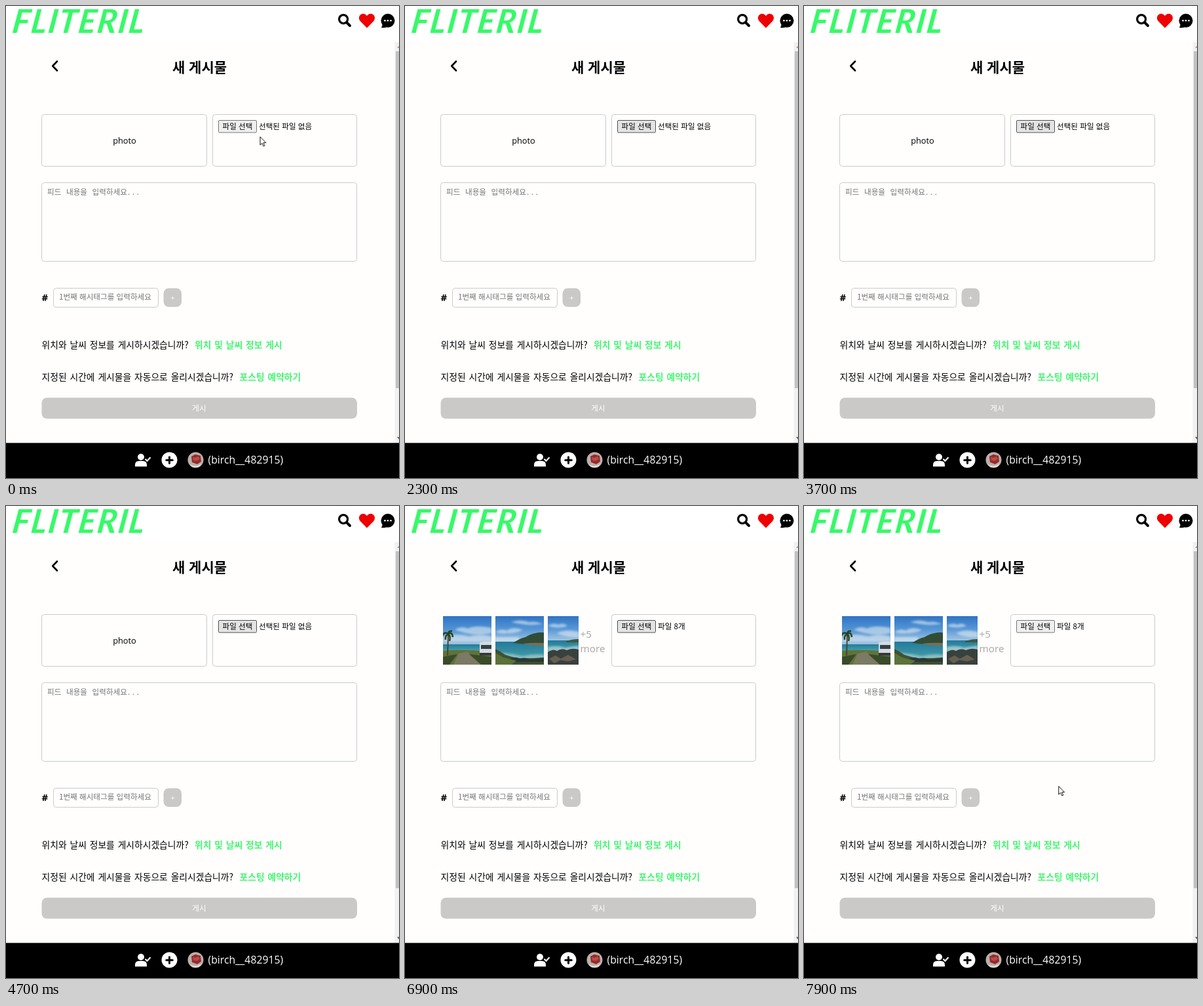
Recreate the animation shown at these times as an HTML page. Size 600 by 720 pixels, loop 8 s.

```html
<!DOCTYPE html>
<html lang="ko">
<head>
<meta charset="utf-8">
<title>새 게시물</title>
<style>
html, body { margin: 0; width: 100%; height: 100%; overflow: hidden; background: #fff; }
svg { display: block; width: 600px; height: 720px; }
text { font-family: "Noto Sans CJK KR", "Noto Sans CJK", sans-serif; }
.latin { font-family: "Open Sans", "Noto Sans", sans-serif; }
.logo { font: italic 700 50px Lato, sans-serif; fill: #36fa68; letter-spacing: 2px; }
.title { font-size: 21px; font-weight: 700; }
.ask { font-size: 13.8px; word-spacing: 1px; }
.link { font-weight: 700; fill: #45f573; }
.small { font-size: 11.6px; }
.hint { fill: #757575; }
.area { word-spacing: 4.4px; }
.dots { letter-spacing: 3.6px; }
.mid { text-anchor: middle; }
.box { fill: #fffefd; stroke: #cbcbcb; }
.off { fill: #cac9c8; }
.pick { fill: #efefef; stroke: #767676; animation: hover 8s step-end infinite; }
.before { animation: before 8s step-end infinite; }
.after { animation: after 8s step-end infinite; }
.cursor { animation: move 8s linear infinite, blink 8s step-end infinite; }
@keyframes hover {
  0%, 90% { fill: #efefef; stroke: #767676; }
  4% { fill: #e4e4e4; stroke: #505050; }
}
@keyframes before { 0% { visibility: visible; } 77.5%, 100% { visibility: hidden; } }
@keyframes after { 0% { visibility: hidden; } 77.5%, 100% { visibility: visible; } }
@keyframes blink {
  0%, 90%, 100% { visibility: visible; }
  13.75% { visibility: hidden; }
}
@keyframes move {
  0%, 1.25% { transform: translate(387.5px, 199px); }
  7%, 50% { transform: translate(362px, 185px); }
  50.01%, 100% { transform: translate(388.3px, 427px); }
}
</style>
</head>
<body>
<svg viewBox="0 0 600 720">
  <defs>
    <linearGradient id="sky" x2="0" y2="1">
      <stop offset="0" stop-color="#2f74c4"/>
      <stop offset=".5" stop-color="#5797d6"/>
      <stop offset="1" stop-color="#a9c9e2"/>
    </linearGradient>
    <linearGradient id="sea" x2="0" y2="1">
      <stop offset="0" stop-color="#237a9c"/>
      <stop offset="1" stop-color="#4fa9a9"/>
    </linearGradient>
    <filter id="soft"><feGaussianBlur stdDeviation="1.5"/></filter>
    <clipPath id="wide"><path d="M0 0h74v74H0z"/></clipPath>
    <clipPath id="slim"><path d="M0 0h47v74H0z"/></clipPath>
  </defs>

  <!-- page -->
  <rect width="600" height="720" fill="#fff"/>
  <rect y="55" width="594" height="612" fill="#fffefd"/>
  <rect x="593.5" y="55" width="7" height="612" fill="#f1f1f1"/>
  <rect x="595" y="69" width="5" height="514" fill="#c1c1c1"/>
  <path d="M597 64l3-3.500V64z" fill="#a3a3a3"/>
  <path d="M597 657.500h3v3.500z" fill="#505050"/>

  <!-- header -->
  <text class="logo" transform="translate(8 41) skewX(-8)">FLITERIL</text>
  <g fill="none" stroke="#000">
    <circle cx="515.100" cy="20.100" r="6.500" stroke-width="3.200"/>
    <path d="M520 25l5 5" stroke-width="3.900" stroke-linecap="round"/>
    <path d="M78 84.500l-6.800 7 6.800 7" stroke-width="2.600" stroke-linecap="round" stroke-linejoin="round"/>
  </g>
  <path d="M551 33.500l-10-10.300c-3-3.300-2.600-8 .7-10.300 3-2 6.400-1.200 9.300 2 2.900-3.200 6.300-4 9.300-2 3.300 2.300 3.700 7 .7 10.300z" fill="#ee0000"/>
  <circle cx="583" cy="22.300" r="10.500"/>
  <path d="M573 33q2-3 1.500-6l7 5q-4 2-8.500 1z"/>
  <g fill="#fff">
    <circle cx="578.500" cy="22.300" r="1.300"/><circle cx="583" cy="22.300" r="1.300"/><circle cx="587.500" cy="22.300" r="1.300"/>
  </g>
  <text class="title mid" x="295.500" y="101">새 게시물</text>

  <!-- photos -->
  <g class="before">
    <rect class="box" x="54.500" y="165.500" width="252" height="79" rx="4"/>
    <text class="latin mid" x="181" y="210" font-size="12.800">photo</text>
  </g>
  <g class="after">
    <g transform="translate(58 168)" clip-path="url(#wide)">
      <path d="M0 0h74v46H0z" fill="url(#sky)"/>
      <path d="M18 21q10-7 20-2 12-6 36-1v8q-26 6-56-5zM0 32q20-7 40-1 18-5 34 0v8H0z" fill="#dfe9f0" opacity=".6" filter="url(#soft)"/>
      <path d="M0 43h74v12H0z" fill="url(#sea)"/>
      <path d="M0 53q20-3 74 1v20H0z" fill="#5f7339"/>
      <path d="M24 57l13-3 22 20H16z" fill="#7c7a62"/>
      <path d="M0 62l22-4-12 16H0zM40 58l34 4v12H58z" fill="#394b29"/>
      <path d="M8 28l-1 32" stroke="#4b4431" stroke-width="2"/>
      <path d="M8 27q-6-4-9 3M8 27q6-4 7 5M8 27q-5 3-4 9M8 27q4 4 2 11M8 27q0-5 6-4" fill="none" stroke="#27441f" stroke-width="2.500"/>
      <path d="M56 40q8-2 18-1v20H56z" fill="#d4dadd"/>
      <path d="M58 44h16v6H58z" fill="#32414c"/>
      <path d="M56 56h18v4H56z" fill="#34393b"/>
    </g>
    <g transform="translate(138 168)" clip-path="url(#wide)">
      <path d="M0 0h74v41H0z" fill="url(#sky)"/>
      <path d="M0 24q9-6 18-2 9-7 24-1-10 6-24 5-10 2-18-2zM24 9q14-5 28 0 9-2 20 3-22 4-48-3zM0 32h36v7H0z" fill="#dfe9f0" opacity=".6" filter="url(#soft)"/>
      <path d="M0 39h74v35H0z" fill="url(#sea)"/>
      <path d="M27 41q10-7 19-9 8-5 15-6 8-2 13-1v19q-20 0-47-3z" fill="#314d36"/>
      <path d="M42 42q15-2 32-1v4q-18 1-32-3z" fill="#776f59"/>
      <path d="M4 55q18 2 38 6 16-4 32-2v7q-24 1-42-2-18-2-28-9z" fill="#c5dedb" opacity=".55" filter="url(#soft)"/>
      <path d="M0 50q9 4 15 9l17 5q19 1 42-1v11H0z" fill="#405133"/>
      <path d="M22 65q8-4 16 0 8-3 14 1l22-2v6H24z" fill="#2d3733"/>
      <path d="M0 56l12 7 20 5-8 6H0z" fill="#5a733a"/>
    </g>
    <g transform="translate(218 168)" clip-path="url(#slim)">
      <path d="M0 0h47v39H0z" fill="url(#sky)"/>
      <path d="M0 15q8-6 16-2 8-4 14 2-14 5-30 0zM14 26q13-7 33-2v8q-20 1-33-6z" fill="#dfe9f0" opacity=".6" filter="url(#soft)"/>
      <path d="M0 37h47v22H0z" fill="url(#sea)"/>
      <path d="M28 38q10-3 19-3v5H28z" fill="#3b5a45"/>
      <path d="M0 47q16-3 26 1l21-3v8q-26 5-47 1z" fill="#d6e5e4" opacity=".6" filter="url(#soft)"/>
      <path d="M0 55q8-6 14-2 8-5 15-1 8-4 18-1v23H0z" fill="#39413e"/>
      <path d="M2 65l10-5 8 5 11-6 12 7-12 3-12-2-9 5z" fill="#675f50"/>
    </g>
    <g fill="#a6a6a6" font-size="15.300">
      <text class="latin" x="267.500" y="201">+5</text>
      <text class="latin" x="267.500" y="223">more</text>
    </g>
  </g>

  <!-- file field -->
  <rect class="box" x="315.500" y="165.500" width="220" height="79" rx="4"/>
  <rect class="pick" x="324.500" y="174.500" width="58" height="18.500" rx="1.500"/>
  <text class="small mid" x="353.500" y="188.300">파일 선택</text>
  <text class="small before" x="386" y="188.300">선택된 파일 없음</text>
  <text class="small after" x="386" y="188.300">파일 8개</text>

  <!-- form -->
  <rect class="box" x="54.500" y="269.500" width="481" height="120" rx="4"/>
  <text class="small hint area" x="63" y="288">피드 내용을 입력하세요<tspan class="dots" dx="1">...</tspan></text>
  <text class="latin" x="54.500" y="450.300" font-size="15" font-weight="700">#</text>
  <rect class="box" x="72.500" y="430.500" width="160" height="29" rx="4"/>
  <text class="small hint" x="81" y="448.300">1번째 해시태그를 입력하세요</text>
  <rect class="off" x="240.500" y="430.500" width="27.500" height="28.500" rx="8"/>
  <text class="latin mid" x="254.500" y="448.500" font-size="11" fill="#fff">+</text>
  <text class="ask" x="54.500" y="521.500">위치와 날씨 정보를 게시하시겠습니까?</text>
  <text class="ask link" x="288" y="521.500">위치 및 날씨 정보 게시</text>
  <text class="ask" x="54.500" y="570.500">지정된 시간에 게시물을 자동으로 올리시겠습니까?</text>
  <text class="ask link" x="356.500" y="570.500">포스팅 예약하기</text>
  <rect class="off" x="54.500" y="597.500" width="481.500" height="32" rx="8"/>
  <text class="small mid" x="295" y="618" fill="#fff">게시</text>

  <!-- footer -->
  <rect y="666.500" width="600" height="54"/>
  <g fill="#fff">
    <circle cx="206" cy="688" r="5"/>
    <path d="M197 702.500v-2.500q0-6 6-6h6q6 0 6 6v2.500z"/>
    <path d="M212.500 691l3 3 5-5.500" fill="none" stroke="#fff" stroke-width="2.200"/>
    <circle cx="249.500" cy="692.500" r="12"/>
    <path d="M249.500 688v9.500M244.800 692.700h9.500" stroke="#000" stroke-width="3" stroke-linecap="round"/>
  </g>
  <circle cx="289.500" cy="692.500" r="12" fill="#b9b0ac"/>
  <path d="M281 699q8 6 17-1l-2 4q-8 4-13 0z" fill="#e4dfdc"/>
  <path d="M283 687l6-3 8 2 1 9-6 4-8-3z" fill="#962a2b"/>
  <path d="M285 688l4 1 5-2 2 4-5 3-5-1z" fill="#b94a46"/>
  <text class="latin" x="308.500" y="698" font-size="15.800" fill="#fff">(birch__482915)</text>

  <path class="cursor" d="M.5.5v12.500l3-2.700 2 4.700 2-.9-2-4.500h3.800z" fill="#fff" stroke="#111"/>
</svg>
</body>
</html>
```
